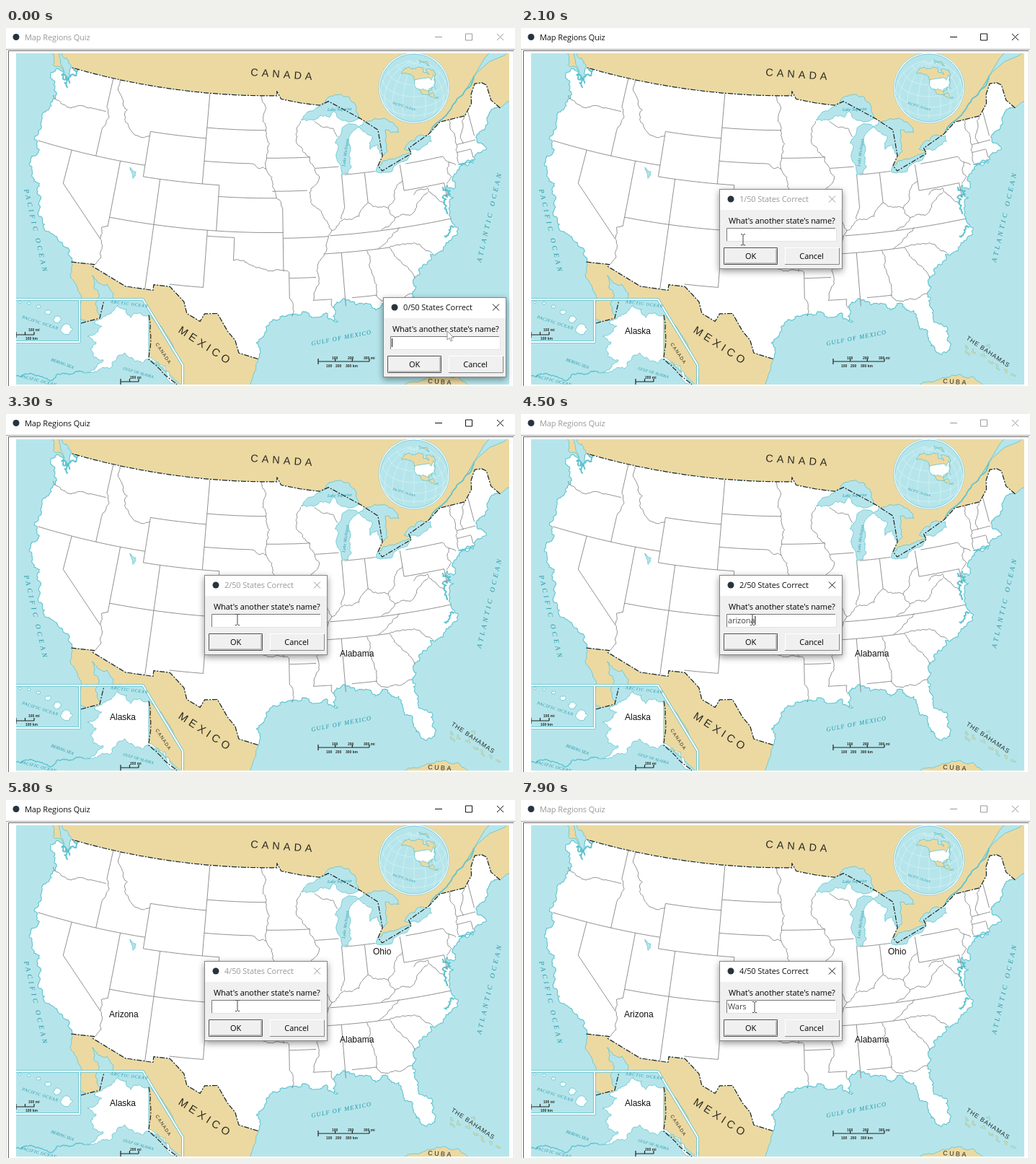
An HTML page that plays this animation: 706x496 px, repeating every 8 s.

```html
<!DOCTYPE html>
<html lang="en">
<head>
<meta charset="utf-8">
<title>Map Regions Quiz</title>
<style>
html, body { margin: 0; width: 100%; height: 100%; overflow: hidden; background: #fff }
svg { display: block; width: 706px; height: 496px; font-family: "Open Sans", "Noto Sans", sans-serif }
path { fill: none; stroke-linejoin: round }
.ui { font-size: 11px; letter-spacing: -.1px }
.sea { font-family: "Liberation Serif", serif; font-style: italic; fill: #2394a6 }
.land { font-family: "Liberation Sans", sans-serif; fill: #2b2b26 }
.state { font: 12px "Liberation Sans", Arial, sans-serif; fill: #111 }
.state text { visibility: hidden }
</style>
</head>
<body>
<svg viewBox="0 0 706 496">
  <defs>
    <clipPath id="mapClip"><path d="M14 35H698V494H14Z"/></clipPath>
    <clipPath id="globeClip"><circle cx="566" cy="83" r="47"/></clipPath>
    <filter id="shadow" x="-20%" y="-20%" width="140%" height="150%">
      <feDropShadow dx="0" dy="3" stdDeviation="5" flood-opacity=".42"/>
    </filter>
  </defs>

  <rect width="706" height="496" fill="#fff"/>
  <path d="M0 29.5H706" stroke="#a5a5a5"/>
  <path d="M3.5 496V31.5H704" stroke="#666"/>
  <path d="M.5 30V496M704.5 31V496" stroke="#ddd"/>
  <circle cx="14" cy="12.5" r="4.5" fill="#263440"/>
  <g id="bar">
    <text class="ui" x="26" y="17" style="fill:currentColor">Map Regions Quiz</text>
    <path d="M595 12.5h10M637.5 8h9v9h-9zM681 8l9 9m0-9l-9 9" stroke="currentColor"/>
  </g>

  <g clip-path="url(#mapClip)">
    <rect x="14" y="35" width="684" height="459" fill="#b5e5eb"/>
    <g id="map"></g>
    <circle cx="566" cy="83" r="49" fill="#fff" stroke="#78c9d3" stroke-width=".7"/>
    <circle cx="566" cy="83" r="47" fill="#b5e5eb" stroke="#63bfcb" stroke-width=".7"/>
    <g id="globe" clip-path="url(#globeClip)"></g>

    <g class="land">
      <text transform="translate(339 66) rotate(4)" font-size="14.500" letter-spacing="5">CANADA</text>
      <text transform="translate(238 421) rotate(33)" font-size="15" letter-spacing="4.500">MEXICO</text>
      <text transform="translate(207 438) rotate(56)" font-size="6.500" letter-spacing="1.200">CANADA</text>
      <text transform="translate(617 431) rotate(34)" font-size="8.500" letter-spacing=".9">THE BAHAMAS</text>
      <text transform="translate(585 492) rotate(4)" font-size="9" letter-spacing="2.400">CUBA</text>
      <g font-size="5" font-weight="bold">
        <text x="31" y="420">100 mi</text><text x="27" y="432">100 km</text>
        <text x="452" y="459">100</text><text x="474" y="459">200</text><text x="496" y="459">300 mi</text>
        <text x="444" y="470">100</text><text x="457" y="470">200</text><text x="471" y="470">300 km</text>
        <text x="172" y="486">200 mi</text>
      </g>
    </g>
    <g class="sea">
      <text transform="translate(25 224) rotate(77)" font-size="9.500" letter-spacing="4">PACIFIC OCEAN</text>
      <text transform="translate(659 325) rotate(-77)" font-size="9.500" letter-spacing="3.800">ATLANTIC OCEAN</text>
      <text transform="translate(424 440) rotate(-11)" font-size="8.500" letter-spacing="1.100">GULF OF MEXICO</text>
      <text transform="translate(470 192) rotate(-82)" font-size="6" letter-spacing=".2">Lake Michigan</text>
      <text transform="translate(446 115) rotate(-2)" font-size="6">Lake Superior</text>
      <text transform="translate(145 381) rotate(7)" font-size="6" letter-spacing=".9">ARCTIC OCEAN</text>
      <text transform="translate(22 402) rotate(18)" font-size="6" letter-spacing=".7">PACIFIC OCEAN</text>
      <text transform="translate(62 461) rotate(20)" font-size="6">BERING SEA</text>
      <text transform="translate(20 484) rotate(14)" font-size="6" letter-spacing=".6">PACIFIC OCEAN</text>
      <text transform="translate(162 473) rotate(16)" font-size="5.500">GULF OF ALASKA</text>
      <text transform="translate(536 105) rotate(17)" font-size="4.500">PACIFIC OCEAN</text>
    </g>
    <g class="state" id="states">
      <text x="144" y="424">Alaska</text>
      <text x="463" y="336">Alabama</text>
      <text x="143" y="301">Arizona</text>
      <text x="509" y="214">Ohio</text>
    </g>
  </g>

  <g id="dialog" class="ui">
    <rect x=".5" y=".5" width="170" height="110" fill="#f0f0f0" stroke="#858585" filter="url(#shadow)"/>
    <rect x="1" y="1" width="169" height="28" fill="#fff"/>
    <circle cx="16" cy="14" r="4.500" fill="#263440"/>
    <g id="head">
      <text id="score" x="28" y="18" style="fill:currentColor"></text>
      <path d="M152 9.500l9 9m0-9l-9 9" stroke="currentColor"/>
    </g>
    <text x="13" y="47.500">What's another state's name?</text>
    <rect x="10" y="54" width="152" height="18" fill="#fff"/>
    <path d="M10.500 72V54.500H161" stroke="#777"/>
    <path d="M10 72.500H162.500V54" stroke="#e2e2e2"/>
    <text id="entry" x="12" y="66.500" fill="#444"></text>
    <path id="caret" stroke="#111"/>
    <path d="M6.500 81.500h74v23h-74z" stroke="#555"/>
    <path d="M8 103h71V83M91 104.500h75.500V82" stroke="#888"/>
    <path d="M91.500 104V81.500H166" stroke="#fff"/>
    <text x="43.500" y="97" text-anchor="middle">OK</text>
    <text x="128" y="97" text-anchor="middle">Cancel</text>
  </g>
  <path id="beam" d="M-3-7.500h2l1 1 1-1h2M0-6.500V6.500M-3 7.500h2l1-1 1 1h2" stroke="#444"/>
  <path id="arrow" d="M0 0V12L3 9.500 5 14 7 13 5 9H9Z" style="fill:#fff" stroke="#777" stroke-width=".8"/>
</svg>

<script>
const $ = id => document.getElementById(id);
const TAN = '#ecd9a1', WATER = '#b5e5eb', SHORE = '#5fc3cf', WHITE = '#fff', GREY = '#858585', INK = '#222';
const { sin, cos, sqrt, hypot, PI } = Math, RAD = PI / 180;

const hash = (x, y) => {
  const v = sin(x * 12.9898 + y * 78.233) * 43758.5453;
  return v - Math.floor(v) - .5;
};
const pairs = text => text.split(', ').map(p => p.split(' ').map(Number));

// Albers equal-area conic; longitudes are degrees west
const N = (sin(29.5 * RAD) + sin(45.5 * RAD)) / 2;
const C = cos(29.5 * RAD) ** 2 + 2 * N * sin(29.5 * RAD);
function albers([lon, lat]) {
  const r = 902 * sqrt(C - 2 * N * sin(lat * RAD)) / N, a = N * (96 - lon) * RAD;
  return [367 + r * sin(a), r * cos(a) - 900];
}
// The small globe, seen from above 125 W, 35 N
function ortho([lon, lat]) {
  const a = (125 - lon) * RAD, p = lat * RAD, q = 35 * RAD;
  return [566 + 47 * cos(p) * sin(a), 83 - 47 * (cos(q) * sin(p) - sin(q) * cos(p) * cos(a))];
}
const geo = text => pairs(text).map(albers);
const range = (n, f) => Array.from({ length: n }, (_, i) => f(i));
const between = (a, b) => range(13, i => a + (b - a) * i / 12);
const parallel = (lat, a, b) => between(a, b).map(lon => albers([lon, lat]));

// Displace midpoints again and again to get a natural coast or river.
function rough(pts, amp) {
  const out = [pts[0]];
  const split = (a, b) => {
    const dx = b[0] - a[0], dy = b[1] - a[1];
    if (hypot(dx, dy) < 3) return out.push(b);
    const mx = (a[0] + b[0]) / 2, my = (a[1] + b[1]) / 2, k = hash(mx, my) * amp;
    const mid = [mx - dy * k, my + dx * k];
    split(a, mid);
    split(mid, b);
  };
  pts.slice(1).forEach((p, i) => split(pts[i], p));
  return out;
}

let art = '';
const trace = pts => 'M' + pts.map(p => p.map(v => v.toFixed(1)).join(' ')).join(' ');
const put = (d, fill, stroke, width = 1, extra = '') =>
  art += `<path d="${d}" style="fill:${fill}" stroke="${stroke}" stroke-width="${width}" ${extra}/>`;
const area = (pts, fill, stroke = SHORE) => put(trace(pts) + 'Z', fill, stroke, .8);
const line = (pts, stroke = GREY, width = .9, extra) => put(trace(pts), 'none', stroke, width, extra);
const border = pts => line(pts, INK, 1.2, 'stroke-dasharray="7 2 2 2"');
const show = id => { $(id).innerHTML = art; art = ''; };

// Coasts and frontiers, in order around the country
const west = '122.8 49, 122.4 47.6, 123.2 48.2, 124.7 48.4, 124.1 46.9, 124 45, 124.5 42.8, 124.1 41.5, 124.4 40.3, 123.7 38.9, 122.5 37.5, 121.9 36.6, 120.6 34.6, 118.4 33.8, 117.1 32.5';
const south = '117.1 32.5, 114.7 32.7, 114.8 32.5, 111.1 31.3, 108.2 31.3, 108.2 31.8, 106.5 31.8, 104.9 30.6, 104.5 29.6, 103.1 29, 102.7 29.7, 101.4 29.8, 100.3 28.3, 99.5 27.5, 99.1 26.4, 97.2 25.9';
const gulf = '97.2 25.9, 97.4 27.3, 96.4 28.4, 93.8 29.7, 91.8 29.5, 89.2 29, 89.5 30.1, 86.3 30.4, 85.3 29.7, 84 30.1, 82.8 29, 82.7 27.8, 81.8 26.1, 80.9 25.2, 80.3 25.4, 80 26.9, 81.3 29.8, 81.4 30.7';
const east = '81.4 30.7, 80.9 32, 79.3 33.2, 77.9 33.9, 76.5 34.7, 75.5 35.2, 76 36.9, 75.1 38.3, 75.5 39.5, 74.9 39, 74 40.5, 71.9 41.1, 73.7 41, 70.6 41.6, 70 41.7, 70.8 42.4, 70.7 43.1, 69 44, 67 44.8';
const north = '95.15 49, 95.15 49.4, 94.6 48.7, 92 48.3, 89.6 48, 88.4 48.3, 84.5 46.5, 82.5 45.3, 82.4 43, 83.1 42.2, 82.7 41.7, 78.9 42.8, 79.1 43.3, 76.3 44.2, 74.7 45, 71.5 45, 70.3 45.9, 70 46.7, 69.2 47.5, 68.3 47.4, 67.8 47.1, 67.8 45.7, 67 44.8';

const coasts = [west, gulf, east].map(c => rough(geo(c), .6));
const frontier = [...parallel(49, 122.8, 95.15), ...geo(north)];
const mexico = geo(south);

// Neighbours
area([...frontier, ...geo('66 45.1, 60 45'), [760, 0], [40, 0], ...rough(geo('127.5 51.5, 123.3 49.3, 122.8 49'), .5)], TAN);
area(rough(geo('123.4 48.4, 125 48.7, 128.3 50.6, 125 49.9, 123.4 48.4'), .5), TAN);
line(rough(geo('76.3 44.2, 73.5 45.6, 71.2 46.8, 69 48.2'), .2), SHORE, 1.8);
area(geo('70.5 47.2, 67 49.4, 65 50.2, 62 50, 64.3 49.1, 66.5 49, 68.5 48.4'), WATER);
area([...mexico, ...rough(geo('97.2 25.9, 97.8 24, 97.8 21'), .2), ...rough(geo('105 21, 109 26, 111 28, 113 31.2, 114.7 31.7, 112.8 28.2, 109.5 23.2, 110 23, 115 27.8, 116 30.5, 117.1 32.5'), .4)], TAN);
area(rough(geo('84.9 21.9, 83 23, 81 23.1, 76 21, 84.9 21.9'), .3), TAN);
for (let i = 0; i < 9; i++) {
  const [x, y] = albers([78.8 - i * .5 + hash(i, 1), 26.6 - i * .55 + hash(i, 2) * 2]);
  const isle = rough([[x, y], [x + 5 + hash(i, 3) * 5, y + 6 + hash(i, 4) * 5]], 1.2);
  line(isle, SHORE, 2);
  line(isle, TAN, 1.2);
}

// The lower 48
area([...coasts[0], ...mexico, ...coasts[1], ...coasts[2], ...frontier.reverse()], WHITE, 'none');
coasts.forEach(c => line(c, SHORE, 1.1));

// Lakes and bays
for (const lake of [
  '92.1 46.8, 89.3 48, 88.2 48.7, 86.5 48.7, 85 47.9, 84.6 46.5, 86.5 46.5, 87.8 47.4, 88.4 46.9, 90.8 46.8, 92.1 46.8',
  '87.6 41.7, 87.9 43, 87.6 44.3, 88 44.6, 87 45.7, 85.5 46.1, 84.8 45.8, 86.3 44.6, 86.4 43, 86.8 41.8, 87.6 41.7',
  '84.8 45.8, 84 46.2, 81 45.9, 80 44.8, 81.6 45.2, 81.7 43.4, 82.4 43, 82.8 44, 83.8 43.7, 83.3 44.8, 84.8 45.8',
  '83.4 41.7, 83.1 42.2, 81.5 42.6, 79 42.9, 80 42.2, 82 41.5, 83.4 41.7',
  '79.7 43.3, 79 43.8, 76.2 44, 76.2 43.5, 79.7 43.3',
  '112.8 41.6, 112 41.3, 112.2 40.7, 112.8 41.6'
]) area(rough(geo(lake), .4), WATER);
for (const bay of ['76.2 37, 76.3 38, 76.1 39.4', '77 35.2, 75.7 35.8', '122.4 49, 122.5 47.2'])
  line(rough(geo(bay), 1), SHORE, 2);

// State lines along parallels: latitude, from, to
for (const p of pairs('46 119 117, 42 124.2 111.05, 37 114.05 94.62, 41 111.05 102.05, 45 111.05 104.05, 43 104.05 98.5, 40 102.05 95.3, 45.94 104.05 96.56, 36.5 103 100, 32 106.6 103.04, 43.5 96.5 91.2, 40.6 95.8 91.7, 36.5 94.6 89.6, 33 94 91.2, 42.5 90.6 87.8, 36.55 89.4 75.9, 35 90.2 83.1, 41.75 87.2 83.5, 31 91.6 89.7, 31 87.6 85, 39.72 80.5 75.8, 42 79.8 75.3, 42.05 73.5 71.8, 42.73 73.3 71'))
  line(parallel(...p));
// and along meridians: longitude, from, to
for (const [lon, a, b] of pairs('117.03 49 46.4, 117.03 44.3 42, 120 42 39, 114.05 42 36.2, 111.05 45 41, 109.05 41 31.3, 104.05 49 41, 102.05 41 37, 103.04 37 32, 100 36.5 34.5, 94.62 39.1 33.6, 94.04 33.5 31.2, 87.53 41.7 39, 84.8 41.7 39.1, 88.3 35 30.3, 80.5 42 39.72, 75.8 39.72 38.5, 71.8 42 41.3, 71 45.3 43.1'))
  line([albers([lon, a]), albers([lon, b])]);
line(geo('120 39, 114.6 35'));

// Rivers and ridges
for (const river of [
  '124 46.2, 122.8 45.7, 121 45.7, 119 46', '117.03 46.4, 116.5 45.5, 117.03 44.3',
  '116.05 49, 116.05 48, 114.4 46.5, 114.5 45.6, 113 44.5, 111.05 44.6', '114.05 36.2, 114.7 36, 114.6 35, 114.2 34.2, 114.7 32.7',
  '97.2 49, 96.6 46, 96.5 43.5, 96.5 42.5', '98.5 43, 96.5 42.5, 95.8 41, 95.3 40, 94.6 39.1',
  '92.2 46.7, 92.8 45.6, 92.7 44.7, 91.2 43.5, 90.2 41.8, 91.2 40.8, 91.4 40, 90.2 38.7, 89.2 37, 90.2 35, 91.1 33.6, 91 32.3, 91.6 31',
  '89.2 37, 87.6 37.9, 86 38, 84.8 39.1, 83.7 38.6, 82.6 38.4, 81.7 39.2, 80.5 40.6', '88 37.9, 87.5 39',
  '100 34.5, 98 34.1, 96.5 33.8, 94 33.5', '94 31.2, 93.8 29.7', '89.7 31, 89.6 30.2', '90.4 46.6, 88.1 45.9, 87.6 45.1',
  '84.3 35, 83 35.8, 81.7 36.6', '83.7 36.6, 82 37.5, 82.6 38.4', '82 37.5, 80.3 37.5, 79.3 38.4, 77.8 39.2',
  '79.5 39.2, 77.8 39.6, 77 38.6, 76.3 38', '83.1 35, 82 33.6, 80.9 32', '83.1 35, 81 35.1, 79.7 34.8, 78.6 33.9',
  '85.6 35, 85.1 32.5, 84.9 30.7, 82.2 30.5, 81.4 30.7', '75.3 42, 74.7 41.4, 75.1 40.8, 74.8 40.1, 75.5 39.6',
  '74.7 41.4, 74 41', '71.5 45, 72.1 44, 72.5 42.7', '73.4 45, 73.3 42.7, 73.6 41.1'
]) line(rough(geo(river), .35));
border(frontier);
border(mexico);

// Inset maps
area(pairs('136 376, 190 376, 245 467, 245 498, 14 498, 14 376, 102 376, 102 410, 130 402'), WATER, 'none');
border(pairs('104 409, 130 402, 136 377'));
area(rough(pairs('198 397, 212 410, 245 470, 245 498, 198 459'), .1), TAN);
const alaska = rough(pairs('198 398, 155 384, 135 400, 122 408, 133 413, 113 427, 125 435, 117 444, 121 456, 135 460, 110 478, 149 462, 165 450, 198 459, 228 492, 236 491, 212 464, 198 455'), .5);
area(alaska, WHITE);
border(rough(pairs('198 398, 198 459, 237 494'), .1));
line(rough(pairs('14 482, 62 489, 109 478'), .4), SHORE, 1.4);
// Islands grow and drift down to the south-east.
for (let i = 0; i < 6; i++) {
  const x = 19 + i * 13, y = 380 + i * i * 1.5, r = 2 + i * i / 4;
  area(rough(range(7, k => [x + r * cos(k * PI / 3), y + r * .8 * sin(k * PI / 3)]), .5), WHITE);
}
for (const [color, width] of [[SHORE, 3.6], [WHITE, 2]])
  for (const frame of ['14 376, 190 376, 245 467, 245 496', '102 376, 102 435, 14 435']) line(pairs(frame), color, width);

// Scale bars: left, baseline, length, divisions
for (const [x, y, w, n] of [[14, 425, 25, 2], [433, 462, 71, 3], [159, 490, 25, 2]])
  put(`M${x} ${y}h${w}` + range(n + 1, i => `M${x + w * i / n} ${y - 4}v${i ? 4 : 8}`).join(''), 'none', INK, 1.2);
show('map');

// Globe
for (let lat = -20; lat < 90; lat += 20) line(between(40, 210).map(lon => ortho([lon, lat])), '#d9f3f5', .7);
for (let lon = 45; lon < 220; lon += 20) line(between(-30, 85).map(lat => ortho([lon, lat])), '#d9f3f5', .7);
for (const coast of [
  '168 66, 156 71, 125 70, 95 71, 83 68, 93 60, 80 52, 78 62, 65 60, 55 52, 70 43, 81 31, 80 25, 84 30, 97 26, 97 19, 88 21, 84 10, 78 8, 95 16, 106 22, 114 31, 124 40, 124 48, 135 58, 152 59, 165 55, 168 66',
  '50 61, 70 78, 30 82, 30 68, 50 61'
]) area(rough(pairs(coast).map(ortho), .4), TAN);
area([west, south, gulf, east].flatMap(pairs).concat(pairs(north).reverse()).map(ortho), WHITE);
show('globe');

// One entry per dialog: opening, focus and typing times, ms per letter, word
const rounds = [
  [0, 0, 900, 100, 'alaska'],
  [1700, 2350, 2450, 95, 'alabama'],
  [3150, 3500, 3720, 110, 'arizona'],
  [4750, 4950, 5050, 90, 'ohio'],
  [5500, 6350, 7450, 120, 'Wars']
];
// Pointer: time, x, y
const route = [[0, 612, 420], [200, 612, 420], [600, 603, 443], [1650, 603, 443], [2000, 308, 294], [2250, 308, 292],
  [2500, 321, 285], [5800, 321, 285], [7200, 324, 287], [8000, 324, 287]];

function pointer(t) {
  const i = route.findIndex(p => p[0] > t), a = route[i - 1], b = route[i];
  const u = (t - a[0]) / (b[0] - a[0]), s = u * u * (3 - 2 * u);
  return [a[1] + (b[1] - a[1]) * s, a[2] + (b[2] - a[2]) * s];
}
const reveal = (el, on) => el.style.visibility = on ? 'visible' : 'hidden';

function draw(now) {
  const t = now % 8000, n = rounds.findLastIndex(r => r[0] <= t);
  const [, focus, start, pace, word] = rounds[n], active = t >= focus;
  const [x, y] = n ? [275, 223] : [523, 373];
  $('dialog').setAttribute('transform', `translate(${x} ${y})`);
  $('score').textContent = n + '/50 States Correct';
  $('bar').style.color = active ? '#999' : '#111';
  $('head').style.color = active ? '#111' : '#999';

  const count = Math.max(0, Math.floor((t - start) / pace) + 1);
  $('entry').textContent = word.slice(0, count);
  const cx = 12.5 + (count ? $('entry').getComputedTextLength() : 0);
  $('caret').setAttribute('d', `M${cx} 57V69`);
  reveal($('caret'), active && (t - focus) % 900 < 600);

  [...$('states').children].forEach((s, i) => reveal(s, i < n));

  const [px, py] = pointer(t);
  const inside = px > x + 10 && px < x + 162 && py > y + 54 && py < y + 73;
  for (const id of ['beam', 'arrow']) {
    $(id).setAttribute('transform', `translate(${px} ${py})`);
    reveal($(id), (id === 'beam') === inside);
  }
}

const begin = performance.now();
(function loop() {
  draw(performance.now() - begin);
  requestAnimationFrame(loop);
})();
</script>
</body>
</html>
```
